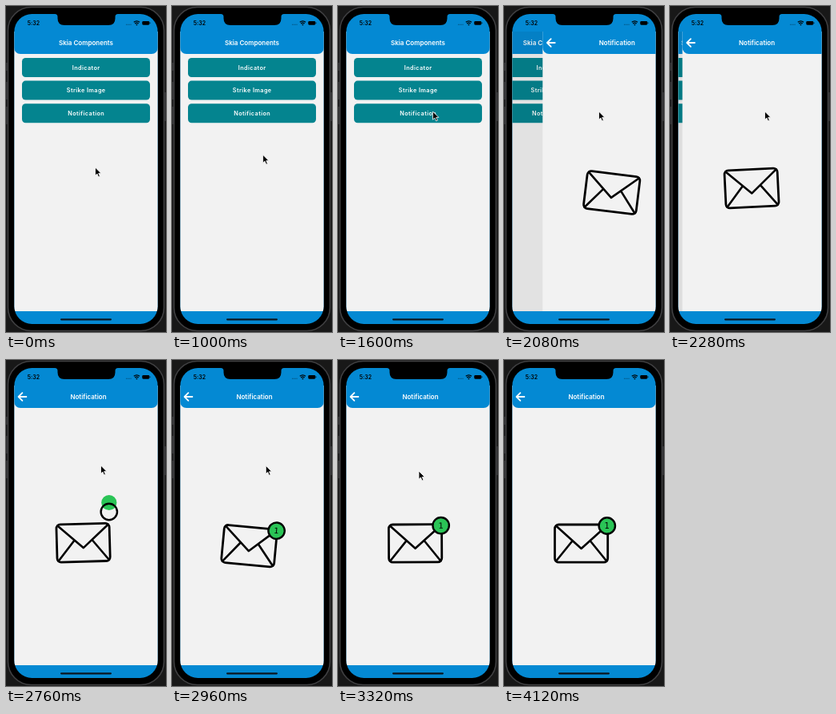
These frames come from a looping animation (200x408 px, 4.2 s). An HTML page:

```html
<!DOCTYPE html>
<html lang="en">
<head>
<meta charset="utf-8">
<title>Skia Components</title>
<style>
html, body { margin: 0; width: 100%; height: 100%; overflow: hidden; background: #181818; }
svg { display: block; width: 100vw; height: 100vh; }
text { font-family: Inter, Roboto, sans-serif; font-weight: 600; text-anchor: middle; }
.title { font-size: 8px; fill: #fff; }
.label { font-size: 7.3px; letter-spacing: .4px; fill: #fff; }
.blue { fill: #0489d3; }
.page { fill: #f2f2f2; }
.line { fill: none; stroke: #000; stroke-linecap: round; stroke-linejoin: round; }
#count { font: 400 10px "DejaVu Sans", sans-serif; }
</style>
</head>
<body>
<svg viewBox="0 0 200 408" preserveAspectRatio="none">
  <defs>
    <clipPath id="glass"><rect x="10.4" y="10" width="179.2" height="388" rx="22"/></clipPath>
    <clipPath id="stack"><rect x="10" y="32" width="180" height="350"/></clipPath>
  </defs>

  <!-- phone body -->
  <g fill="#303032">
    <rect x="0" y="71" width="2" height="10"/>
    <rect x="0" y="95" width="2" height="22"/>
    <rect x="0" y="126" width="2" height="22"/>
    <rect x="198" y="108" width="2" height="36"/>
  </g>
  <rect x="2.5" y="1.5" width="195" height="405" rx="29" stroke="#404042" stroke-width="1.6"/>

  <g clip-path="url(#glass)">
    <rect class="blue" x="10" y="10" width="180" height="388"/>
    <g clip-path="url(#stack)">
      <g id="home">
        <rect class="page" x="10" y="31" width="180" height="352"/>
        <path class="blue" d="M10 31H190V52a8 8 0 0 1-8 8H18a8 8 0 0 1-8-8Z"/>
        <text class="title" x="100" y="48.8">Skia Components</text>
        <g id="buttons"></g>
        <rect id="dim" x="10" y="31" width="180" height="352" opacity="0"/>
      </g>
      <g id="detail">
        <rect class="page" x="10" y="31" width="180" height="352"/>
        <path class="blue" d="M10 31H190V52a8 8 0 0 1-8 8H18a8 8 0 0 1-8-8Z"/>
        <path class="line" d="M25.4 46H15.8M20.4 41.2L15.6 46L20.4 50.8" style="stroke:#fff;stroke-width:1.8"/>
        <text class="title" x="103" y="48.8">Notification</text>
        <g id="streaks" fill="#2ac456">
          <rect x="140.6" y="222.5" width="3.5" height="21"/>
          <rect x="133.7" y="245" width="3.5" height="12"/>
        </g>
        <g id="mail">
          <rect class="line" x="63.5" y="206" width="66.2" height="47.2" rx="5" stroke-width="2.8"/>
          <path class="line" stroke-width="2.6" d="M65 207.5L96.6 236L128.3 207.5M65 251.8L85 227M128.3 251.8L108.3 227"/>
        </g>
        <g id="badge">
          <circle id="fill" cx="128.8" cy="207.5" r="9.6" fill="#2ac456"/>
          <circle id="ring" class="line" cx="128.8" cy="207.5" r="10.2" stroke-width="2.4"/>
          <text id="count" x="128.8" y="211">1</text>
        </g>
      </g>
    </g>
    <path d="M61 9V10Q64.5 10 64.5 13.5V15.5Q64.5 24 73 24H128Q136.5 24 136.5 15.5V13.5Q136.5 10 140 10V9Z"/>
    <text x="34.5" y="24" style="font-size:7px">5:32</text>
    <path d="M150 23.2h6.6" stroke="#000" stroke-opacity=".45" stroke-width="1.1" stroke-dasharray="1.1 .75"/>
    <g class="line" stroke-width="1.3" style="stroke-linecap:butt">
      <path d="M159.8 20.3Q163.4 17.3 167 20.3M161.2 22Q163.4 20.2 165.6 22"/>
    </g>
    <path d="M162.2 23.2Q163.4 22.3 164.6 23.2L163.4 24.5Z"/>
    <rect x="170.3" y="18.9" width="9" height="4.8" rx="1.4"/>
    <rect x="179.7" y="20.5" width=".7" height="1.6" rx=".3"/>
    <rect x="68" y="391.2" width="64" height="2.2" rx="1.1" fill="#0b1620"/>
  </g>

  <path id="cursor" d="M0 0V10.2L2.4 8L4.1 12L5.9 11.2L4.2 7.4H7.4Z" stroke="#fff" stroke-width=".8" stroke-linejoin="round"/>
</svg>
<script>
const LOOP = 4200, STEP = 40, PUSH_AT = 1840, LAND_AT = 2880, WIDTH = 179;
const $ = id => document.getElementById(id);
const move = (id, x, y) => $(id).setAttribute('transform', `translate(${x} ${y})`);
const turn = (id, angle) => $(id).setAttribute('transform', `rotate(${angle} 64 230)`);
const show = (id, on) => $(id).style.display = on ? '' : 'none';

$('buttons').innerHTML = ['Indicator', 'Strike Image', 'Notification'].map((name, i) => {
  const y = 65 + i * 28.6;
  return `<rect x="20" y="${y}" width="160" height="24" rx="4.5" fill="#04848f"/>
    <text class="label" x="100.2" y="${y + 14.6}">${name}</text>`;
}).join('');

// rows of [time, ...values]
const pointer = [
  [840, 111.5, 202], [1120, 115, 176], [1400, 121, 141], [1600, 118.5, 132],
  [2900, 118.5, 132], [3120, 112, 134], [3320, 101, 139], [3440, 98.5, 164],
  [3560, 108, 255], [3680, 126, 392]
];
const tilt = [
  [1800, 7], [2080, 7], [2240, -4], [2380, 2], [2520, -1], [2640, 0.5], [2760, -1.6],
  [LAND_AT, 0], [2980, 6], [3080, -3], [3180, 1.5], [3280, -0.4], [3400, 0]
];

function at(rows, t) {
  if (t <= rows[0][0]) return rows[0].slice(1);
  const i = rows.findIndex(r => r[0] > t);
  if (i < 0) return rows[rows.length - 1].slice(1);
  const a = rows[i - 1], b = rows[i];
  const u = (t - a[0]) / (b[0] - a[0]), e = u * u * (3 - 2 * u);
  return a.slice(1).map((v, k) => v + (b[k + 1] - v) * e);
}

// critically damped spring that settles at 1
function push(t) {
  const s = Math.max(0, t - PUSH_AT) * 0.0121;
  const p = 1 - (1 + s) * Math.exp(-s);
  return p > 0.996 ? 1 : p;
}

// height of a toss that peaks halfway
function toss(t, from, to, height) {
  const u = (t - from) / (to - from);
  return u > 0 && u < 1 ? -4 * height * u * (1 - u) : 0;
}

function draw(t) {
  const p = push(t);
  move('home', -0.3 * WIDTH * p, 0);
  show('home', p < 1);
  move('detail', WIDTH * (1 - p), 0);
  show('detail', p > 0);
  $('dim').setAttribute('opacity', 0.085 * p);

  const [angle] = at(tilt, t);
  turn('mail', angle);
  show('streaks', t >= 2480 && t < 2600);
  move('streaks', 0, (2520 - t) * 0.2);

  show('badge', t >= 2640);
  turn('badge', t < LAND_AT ? 0 : angle);
  move('ring', 0, toss(t, 2600, 2860, 18.5));
  move('fill', 0, toss(t, 2600, 2920, 29));
  show('count', t >= 2920);

  show('cursor', t < 3720);
  move('cursor', ...at(pointer, t));
}

const start = performance.now();
function tick() {
  const t = (performance.now() - start) % LOOP;
  draw(Math.floor(t / STEP) * STEP);
  requestAnimationFrame(tick);
}
tick();
</script>
</body>
</html>
```
